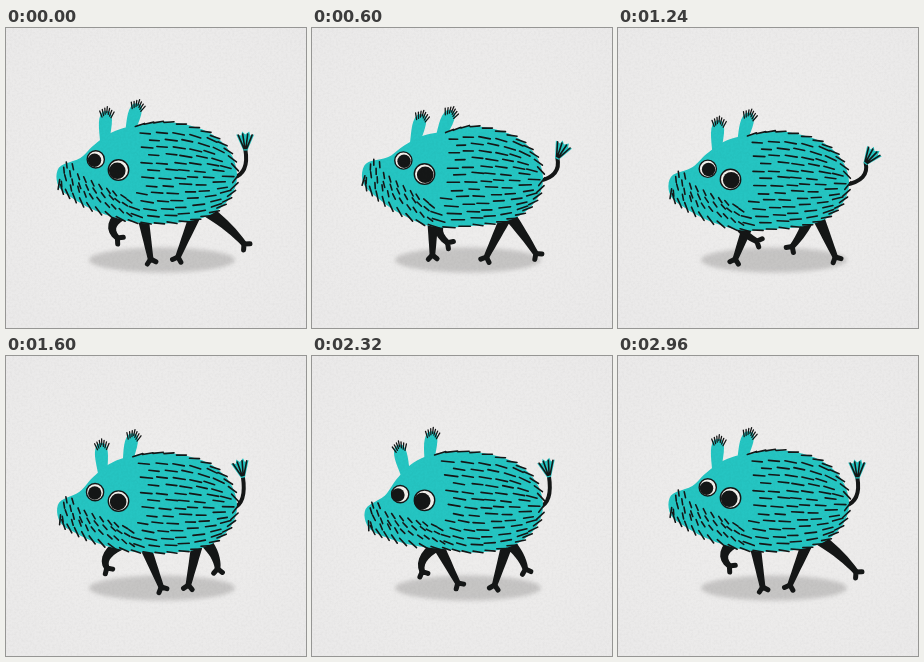
Recreate the animation shown at these times as an HTML page. Size 300 by 300 pixels, loop 3 s.

```html
<!DOCTYPE html>
<html lang="en">
<head>
<meta charset="utf-8">
<title>Walking boar</title>
<style>
  html, body { margin: 0; width: 100%; height: 100%; overflow: hidden; background: #ecebeb; }
  svg { display: block; width: 100%; height: 100%; }
</style>
</head>
<body>
<svg viewBox="0 0 300 300" xmlns="http://www.w3.org/2000/svg">
  <defs>
    <radialGradient id="paper" r="0.75">
      <stop offset="0" stop-color="#efeeed"/>
      <stop offset="1" stop-color="#eae9e9"/>
    </radialGradient>
    <filter id="soft" x="-20%" y="-50%" width="140%" height="200%"><feGaussianBlur stdDeviation="2"/></filter>
    <filter id="grain" x="0" y="0" width="100%" height="100%">
      <feTurbulence type="fractalNoise" baseFrequency="0.45" numOctaves="2" seed="4"/>
      <feColorMatrix values="0 0 0 0 0  0 0 0 0 0  0 0 0 0 0  0.5 0 0 0 -0.17"/>
    </filter>
  </defs>
  <rect width="300" height="300" fill="url(#paper)"/>
  <ellipse cx="156" cy="232" rx="73" ry="12.5" fill="#c6c5c4" filter="url(#soft)"/>
  <g id="boar" stroke-linecap="round" stroke-linejoin="round"></g>
  <rect width="300" height="300" filter="url(#grain)" opacity="0.1"/>
</svg>
<script>
const LOOP = 3000, FRAME = 40;
const STRIDE = 1480, BOUNCE = STRIDE / 2, NOD = STRIDE * 2;
const TEAL = '#25c5c2', INK = '#151717', WHITE = '#f3f1ec';

const boar = document.getElementById('boar');
function set(el, attrs) {
  for (const k in attrs) el.setAttribute(k, attrs[k]);
}
function add(tag, attrs) {
  const el = document.createElementNS('http://www.w3.org/2000/svg', tag);
  set(el, attrs);
  return boar.appendChild(el);
}
const filled = color => add('path', { fill: color });
const stroked = width => add('path', { fill: 'none', stroke: INK, 'stroke-width': width });

// Cosine wave of the given period that peaks at time `peak`
const wave = (t, period, peak) => Math.cos(2 * Math.PI * (t - peak) / period);
const lerp = (a, b, u) => a + (b - a) * u;
const smoothstep = u => { u = Math.min(1, Math.max(0, u)); return u * u * (3 - 2 * u); };
const line = pts => 'M' + pts.map(p => p[0].toFixed(1) + ' ' + p[1].toFixed(1)).join('L');

let seed = 7;
const random = () => (seed = seed * 16807 % 2147483647) / 2147483647;
const jitter = r => (random() * 2 - 1) * r;

// Maps points relative to a pivot, turned by degrees
function placer(px, py, degrees) {
  const a = degrees * Math.PI / 180, c = Math.cos(a), s = Math.sin(a);
  return (x, y) => [px + x * c - y * s, py + x * s + y * c];
}

// Resting silhouette, clockwise from the snout
const corners = [[53, 141], [74, 131], [88, 117], [108, 103], [135, 96], [165, 94],
  [202, 104], [224, 124], [231, 149], [223, 171], [202, 188], [168, 195],
  [130, 194], [95, 185], [70, 173], [53, 160]];
function smoothLoop(pts, steps) {
  const n = pts.length, out = [];
  pts.forEach((p, i) => {
    const a = pts[(i + n - 1) % n], c = pts[(i + 1) % n], d = pts[(i + 2) % n];
    for (let s = 0; s < steps; s++) {
      const u = s / steps;
      out.push([0, 1].map(k => 0.5 * (2 * p[k] + (c[k] - a[k]) * u +
        (2 * a[k] - 5 * p[k] + 4 * c[k] - d[k]) * u * u +
        (3 * p[k] - a[k] - 3 * c[k] + d[k]) * u * u * u)));
    }
  });
  return out;
}
const outline = smoothLoop(corners, 6);

function makeHairs() {
  const hairs = [];
  const hair = (x, y, angle, back, front) => {
    const c = Math.cos(angle), s = Math.sin(angle);
    hairs.push([[x - c * back, y - s * back], [x + c * front, y + s * front]]);
  };
  // coat: staggered rows narrowing toward the rump
  for (let row = 0; row < 12; row++) {
    const v = -0.85 + row * 0.155;
    const rowY = x => 146 + v * 49 * Math.sqrt(1 - (Math.max(0, x - 155) / 84) ** 2);
    const left = 141 - Math.max(0, v - 0.2) * 25;
    for (let x = left + (row % 2) * 7; x < 226 - 18 * v * v; x += 16) {
      const slope = (rowY(x + 3) - rowY(x - 3)) / 6;
      const droop = 0.35 * smoothstep((155 - x) / 30) * Math.max(0, v);
      hair(x + jitter(2), rowY(x) + jitter(1), Math.atan(slope) + 0.09 + droop, 5.5, 5.5 + jitter(1.2));
    }
  }
  // bristles on snout and cheek, steep in front and flatter behind
  for (let row = 0; row < 4; row++) {
    const end = row === 3 ? 72 : 126;
    for (let x = 57 + (row % 2) * 3; x < end; x += 7.5) {
      const u = (x - 57) / 70;
      hair(x + jitter(1.2), 157 + u * 30 - row * 7 + jitter(1.2), lerp(1.4, 0.55, u) + jitter(0.1), 3, 3);
    }
  }
  // fringe along the back, rump and belly
  for (let i = 24; i < 92; i += 2) {
    const p = outline[i], o = outline[i - 1], q = outline[i + 1];
    const len = Math.hypot(q[0] - o[0], q[1] - o[1]);
    const tx = (q[0] - o[0]) / len, ty = (q[1] - o[1]) / len;
    const side = p[1] < 149 ? 1 : -1;
    const lift = 0.25 + (side < 0 ? smoothstep((140 - p[0]) / 60) : 0);
    const dx = tx * side + ty * lift + 0.5, dy = ty * side - tx * lift;
    hair(p[0], p[1], Math.atan2(dy, dx) + jitter(0.06), 7, 3);
  }
  return hairs;
}
const hairs = makeHairs();

// Hind foot: steady push backward, quick swing forward
const hindReach = t => {
  const u = (t % STRIDE + STRIDE) % STRIDE / BOUNCE;
  return u < 1 ? u : (2 - u) ** 3;
};
const hind = (hip, x, delay) => ({
  hip, bend: 3, ground: 229,
  foot: t => x + 64 * hindReach(t - delay),
  lift: t => wave(t, STRIDE, 960 + delay)
});
const fore = (hip, x, ground, delay) => ({
  hip, bend: -9, ground,
  foot: t => x + 28 * wave(t, STRIDE, 260 + delay),
  lift: t => wave(t, STRIDE, 700 + delay)
});
const legs = [fore(121, 124, 227, BOUNCE), fore(135, 132, 231, 0), hind(198, 174, BOUNCE), hind(193, 172, 0)];

const tailLine = stroked(4), tuftShape = filled(TEAL), tuftHairs = stroked(1.6);
const legShape = filled(INK), toes = stroked(5);
const earShape = filled(TEAL), earHairs = stroked(1.3);
const body = filled(TEAL), coat = stroked(1.6);
const eyes = [[89.5, 132, 8.6], [112.5, 142, 10.2]].map(([x, y, r]) => ({
  x, y,
  white: add('circle', { r, fill: WHITE, stroke: INK, 'stroke-width': 1.4 }),
  pupil: add('circle', { r: r - 1.9, fill: INK })
}));

function drawLegs(t, bob) {
  let shape = '', feet = '';
  for (const leg of legs) {
    const lift = Math.sqrt(Math.max(0, leg.lift(t)));
    const fx = leg.foot(t), fy = leg.ground - 17 * lift;
    const hx = lerp(leg.hip, fx, 0.12), hy = 184 + bob * 0.6;
    const cx = (hx + fx) / 2 + 2 * leg.bend * lift, cy = (hy + fy) / 2;
    const front = [], rear = [];
    let angle = 0;
    for (let u = 0; u <= 1; u += 0.125) {
      const w = lerp(6, 2.8, u);
      const x = lerp(lerp(hx, cx, u), lerp(cx, fx, u), u);
      const y = lerp(lerp(hy, cy, u), lerp(cy, fy, u), u);
      angle = Math.atan2(lerp(cy - hy, fy - cy, u), lerp(cx - hx, fx - cx, u));
      const nx = -Math.sin(angle) * w, ny = Math.cos(angle) * w;
      front.push([x + nx, y + ny]);
      rear.unshift([x - nx, y - ny]);
    }
    shape += line(front.concat(rear)) + 'Z';
    for (const spread of [-0.9, 0.75]) {
      feet += line([[fx, fy], [fx + Math.cos(angle + spread) * 6, fy + Math.sin(angle + spread) * 6]]);
    }
  }
  set(legShape, { d: shape });
  set(toes, { d: feet });
}

function drawEars(turn, warp) {
  const tilt = 1.5 * turn + 2;
  let shape = '', tips = '';
  for (const [base, angle] of [[[98, 113], tilt], [[123, 104], tilt * 0.6 + 14]]) {
    const at = placer(...warp(base), angle);
    const p = (x, y) => at(x, y).map(n => n.toFixed(1)).join(' ');
    shape += `M${p(-4, 6)}C${p(-5, -6)} ${p(-10, -20)} ${p(-5, -28)}` +
             `Q${p(0, -32)} ${p(4, -28)}C${p(8, -20)} ${p(4, -6)} ${p(5, 6)}Z`;
    for (let i = -3; i <= 3; i++) {
      const drop = Math.abs(i) * 1.6;
      tips += `M${p(i * 1.5, drop - 28)}L${p(i * 2.4, drop - 34)}`;
    }
  }
  set(earShape, { d: shape });
  set(earHairs, { d: tips });
}

function drawTail(t, warp) {
  const sway = -wave(t, BOUNCE, 120);
  const [rx, ry] = warp([227, 150]);
  const at = placer(244 + 9 * sway, 120 - 9 * wave(t, BOUNCE, 70), 12 + 24 * sway);
  const [bx, by] = at(0, 9);
  set(tailLine, { d: `M${rx} ${ry}Q${Math.max(bx, rx) + 4} ${ry - 5} ${bx} ${by}` });
  const fan = [[-2, 10], [-9, -6], [-4, -5], [-3, -9], [0, -6], [4, -9], [5, -5], [9, -6], [2, 10]];
  set(tuftShape, { d: line(fan.map(p => at(...p))) + 'Z' });
  set(tuftHairs, { d: [-7, -2.5, 2.5, 7].map(x =>
    line([at(x * 0.2, 8), at(x, Math.abs(x) * 0.2 - 7)])).join('') });
}

function draw(now) {
  const t = Math.floor(now % LOOP / FRAME) * FRAME % NOD;
  const bob = 6.5 * (1 - wave(t, BOUNCE, 0));
  const turn = 1.5 + 10 * wave(t, NOD, NOD / 4) - bob / 2;
  const gaze = 1.7 * wave(t, NOD, 930) - 0.6;
  const head = placer(113, 142 + bob, turn);
  // the head turns about the near eye and blends into the bobbing trunk
  const warp = ([x, y]) => {
    const w = smoothstep((162 - x) / 48);
    const [hx, hy] = head(x - 113, y - 142);
    return [lerp(x, hx, w), lerp(y + bob * (1 - 0.45 * (y - 94) / 103), hy, w)];
  };
  drawTail(t, warp);
  drawLegs(t, bob);
  drawEars(turn, warp);
  set(body, { d: line(outline.map(warp)) + 'Z' });
  set(coat, { d: hairs.map(h => line(h.map(warp))).join('') });
  for (const e of eyes) {
    const [x, y] = warp([e.x, e.y]);
    set(e.white, { cx: x, cy: y });
    set(e.pupil, { cx: x + gaze, cy: y + 0.8 });
  }
}

const start = performance.now();
function tick() {
  draw(performance.now() - start);
  requestAnimationFrame(tick);
}
tick();
</script>
</body>
</html>
```
